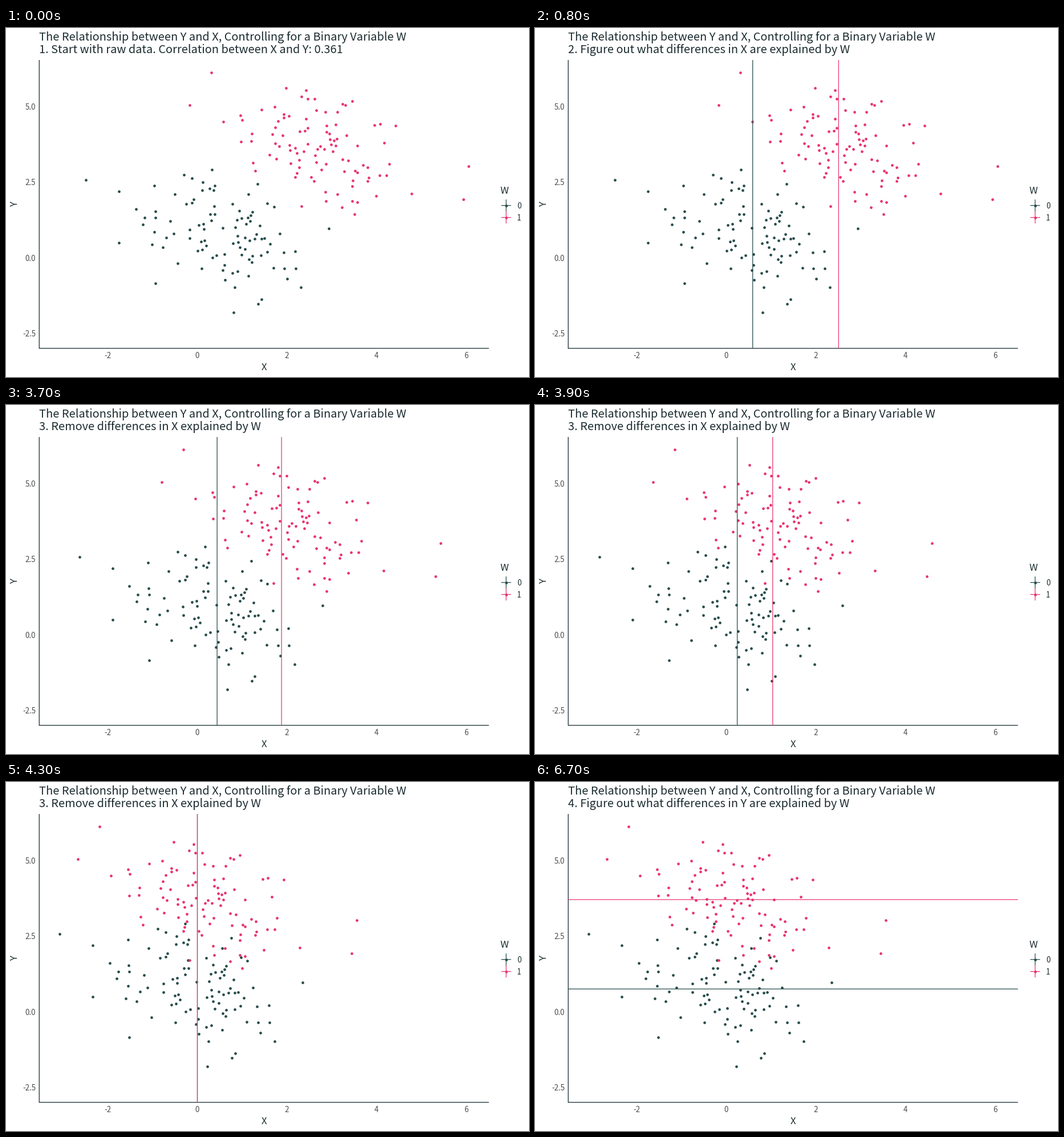
A matplotlib script for the animation above (8000 ms loop, 917 by 611 pixels).

```python
import math

import matplotlib.pyplot as plt
import numpy as np
from matplotlib.animation import FuncAnimation

W, H, DPI = 917, 611, 64
PT = 72 / DPI  # points per pixel
STEP_MS, FRAMES = 100, 80

TEXT, INK, GREY = "#1c2c30", "#23373b", "#4d4d4d"
DARK, PINK = "#264b4b", "#e8336d"
LEFT, RIGHT, TOP, BOTTOM = 58.3, 846.7, 56, 560.8
X0, X_UNIT = 335.5, 78.55
Y0, Y_UNIT = 402.9, 53.0

TITLE = "The Relationship between Y and X, Controlling for a Binary Variable W"
STEPS = [
    (0, "1. Start with raw data. Correlation between X and Y: 0.361"),
    (500, "2. Figure out what differences in X are explained by W"),
    (3500, "3. Remove differences in X explained by W"),
    (6400, "4. Figure out what differences in Y are explained by W"),
]

plt.rcParams["font.family"] = ["Noto Sans CJK JP", "DejaVu Sans"]
rng = np.random.default_rng(11)


def cloud(mean, outliers, count=100, spread=(80, 57), slope=0.27, gap=5.5):
    """Outliers plus a tilted normal core, cut at two sigma, without overlaps."""
    points = [np.array(p) + 0.4 for p in outliers]
    while len(points) < count:
        z = rng.normal(size=2)
        if np.hypot(*z) > 2:
            continue
        dx, dy = z * spread
        p = np.array([mean[0] + dx, mean[1] + dy + slope * dx])
        if all(np.hypot(*(p - q)) > gap for q in points):
            points.append(p)
    return np.array(points)


def sine_in_out(t):
    return (1 - math.cos(math.pi * min(max(t, 0), 1))) / 2


fig = plt.figure(figsize=(W / DPI, H / DPI), dpi=DPI, facecolor="white")
ax = fig.add_axes([0, 0, 1, 1])
ax.set(xlim=(0, W), ylim=(H, 0))
ax.axis("off")


def label(x, y, text, size, color=TEXT, **kw):
    return ax.text(x, y, text, fontsize=size * PT, color=color,
                   va="baseline", **kw)


def line(xs, ys, color, width=1.25, **kw):
    return ax.plot(xs, ys, color=color, lw=width * PT, snap=False,
                   solid_capstyle="butt", **kw)[0]


def dots(points, color, zorder=2):
    return ax.scatter(*np.transpose(points), s=(4.7 * PT) ** 2, color=color,
                      linewidths=0, zorder=zorder)


class Group:
    def __init__(self, color, mean, outliers, zorder):
        self.mean_x, mean_y = mean
        self.points = cloud(mean, outliers)
        self.dots = dots(self.points, color, zorder)
        self.vline = line([self.mean_x] * 2, [TOP, BOTTOM], color, zorder=zorder + 2)
        self.hline = line([LEFT, RIGHT], [mean_y] * 2, color, zorder=zorder + 2)

    def update(self, ms, progress):
        shift = progress * (X0 - self.mean_x)
        self.dots.set_offsets(self.points + [shift, 0])
        self.vline.set_xdata([self.mean_x + shift] * 2)
        self.vline.set_visible(800 <= ms < 6400)
        self.hline.set_visible(ms >= 6700)


groups = [
    Group(DARK, (381.7, 362.4),
          [(140, 266), (198, 286), (198, 376), (262, 447), (566, 351), (399, 498)], 2),
    Group(PINK, (532.3, 205.9),
          [(360, 78), (322, 135), (683, 171), (811, 242), (802, 300), (711, 290)], 3),
]

# Axes
line([LEFT, LEFT], [TOP, BOTTOM + 0.6], INK, 1.35)
line([LEFT, RIGHT], [BOTTOM, BOTTOM], INK, 1.35)
for v in range(-2, 7, 2):
    label(X0 + v * X_UNIT, 578.3, str(v), 13.3, GREY, ha="center")
for v in np.arange(-2.5, 6, 2.5):
    label(52.2, Y0 - v * Y_UNIT + 5, f"{v:.1f}", 13.3, GREY, ha="right")
label(452.4, 599.3, "X", 16.7, ha="center")
label(20, 308.4, "Y", 16.7, ha="center", rotation=90, rotation_mode="anchor")

# Legend
label(866.5, 290, "W", 16.7)
for row, color in enumerate((DARK, PINK)):
    y = 310.7 + 21 * row
    line([868.3, 885.5], [y, y], color)
    line([876.9, 876.9], [y - 10.5, y + 10.5], color)
    dots([(876.9, y)], color)
    label(896, y + 5.6, str(row), 13.3)

label(57.5, 22.3, TITLE, 20)
subtitle = label(57.5, 44.3, "", 20)


def update(frame):
    ms = frame * STEP_MS
    subtitle.set_text([text for start, text in STEPS if ms >= start][-1])
    progress = sine_in_out((ms - 3400) / 900)
    for group in groups:
        group.update(ms, progress)
    return []


anim = FuncAnimation(fig, update, frames=FRAMES, interval=STEP_MS,
                     repeat=True, repeat_delay=0, blit=False)
plt.show()
```
